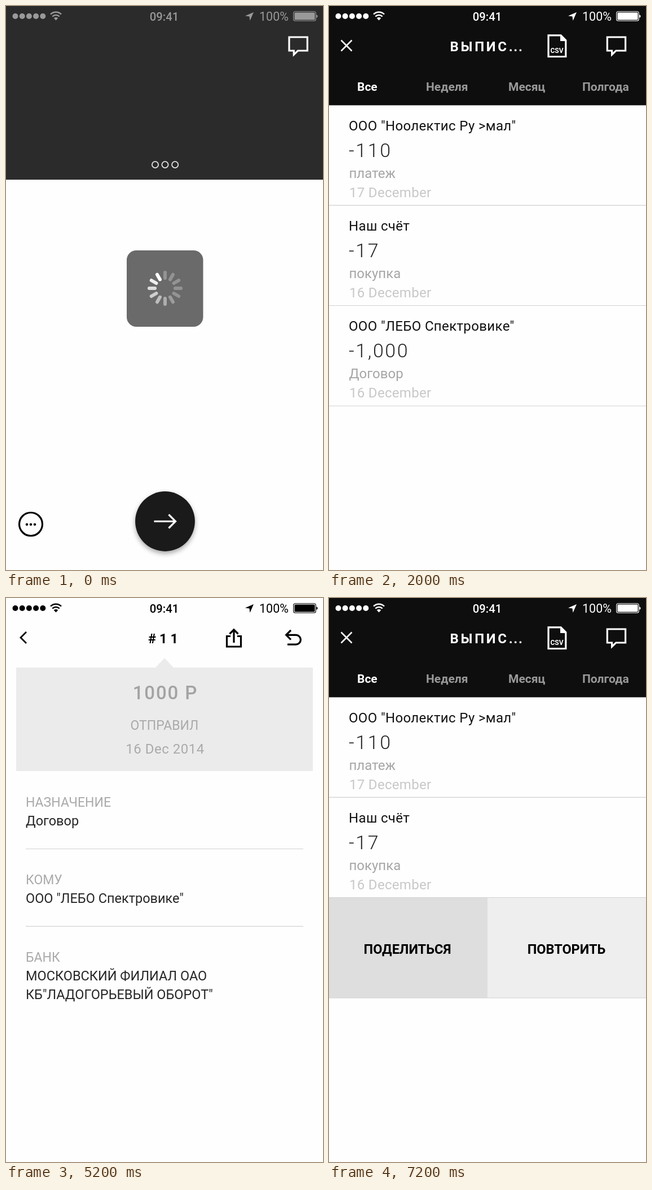
An HTML page that plays this animation: 562 px wide and 997 px high, repeating every 8000 ms.

```html
<!DOCTYPE html>
<html lang="ru">
<head>
<meta charset="utf-8">
<title>Выписка</title>
<style>
html, body { margin: 0; width: 100%; height: 100%; overflow: hidden; background: #fff; }
svg { display: block; width: 100%; height: 100%; font-family: Roboto, "Noto Sans", sans-serif; font-size: 24px; }
.line { fill: none; stroke: currentColor; stroke-width: 3.2; }
.mid { text-anchor: middle; }
.b { font-weight: 700; }
.name { letter-spacing: .35px; fill: #111; }
.sum { font-size: 34px; font-weight: 300; letter-spacing: 2.6px; fill: #222; }
.note { fill: #a6a6a6; }
.date { letter-spacing: .3px; fill: #c8c8c8; }
.tab { font-size: 21px; font-weight: 700; fill: #999; }
.label { font-size: 23px; fill: #aaa; }
.value { font-size: 23.5px; fill: #262626; }
.rule { stroke: #d2d2d2; stroke-width: 1.2; }

.status, .bar, .go, .loaded, .hud, .list, .panel, .shade, .press, .swipe { animation: 8s linear infinite; }
.status { animation-name: status; }
.bar { animation-name: bar; }
.go { animation-name: go; }
.loaded { animation-name: loaded; }
.hud { animation-name: hud; }
.spin { animation: spin 1s steps(12) infinite; }
.list { animation-name: appear, shift; }
.panel { animation-name: panel; }
.shade { animation-name: shade; }
.press { animation-name: press; }
.swipe { animation-name: swipe; }

@keyframes status {
  0% { color: #999; }
  4%, 48.75% { color: #fff; }
  54%, 66.5% { color: #000; }
  71.25% { color: #999; }
  74.5%, 100% { color: #fff; }
}
@keyframes bar { 0% { fill: #2b2b2b; } 4%, 100% { fill: #111; } }
@keyframes go { 0% { fill: #1a1a1a; } 4%, 100% { fill: #000; } }
@keyframes loaded { 0%, 12.5% { opacity: 0; } 15%, 100% { opacity: 1; } }
@keyframes hud { 0%, 11.5% { opacity: 1; } 14.5%, 100% { opacity: 0; } }
@keyframes spin { to { transform: rotate(360deg); } }
@keyframes appear { 0%, 17% { opacity: 0; } 23%, 100% { opacity: 1; } }
@keyframes shift {
  0%, 47.56% { transform: translateX(0); animation-timing-function: cubic-bezier(.4, 0, .2, 1); }
  55.06%, 66.12% { transform: translateX(-168.6px); animation-timing-function: cubic-bezier(.4, 0, .2, 1); }
  73.62%, 100% { transform: translateX(0); }
}
@keyframes panel {
  0%, 47.56% { transform: translateX(562px); animation-timing-function: cubic-bezier(.4, 0, .2, 1); }
  55.06%, 66.12% { transform: translateX(0); animation-timing-function: cubic-bezier(.4, 0, .2, 1); }
  73.62%, 100% { transform: translateX(562px); }
}
@keyframes shade { 0%, 47.5% { opacity: 0; } 48%, 55% { opacity: 1; } 66%, 100% { opacity: 0; } }
@keyframes press { 0%, 45.5% { opacity: 0; } 46.25%, 56.25% { opacity: 1; } 56.3%, 100% { opacity: 0; } }
@keyframes swipe {
  0%, 80.6% { transform: translateX(0); animation-timing-function: cubic-bezier(.4, 0, .2, 1); }
  89.4%, 100% { transform: translateX(-562px); }
}
</style>
</head>
<body>
<svg viewBox="0 0 562 997" preserveAspectRatio="none">
  <defs>
    <linearGradient id="edge">
      <stop offset="0" stop-opacity="0"/>
      <stop offset="1" stop-opacity=".18"/>
    </linearGradient>
    <path id="chat" class="line" d="M502 55H534.3V79H517.5L510.3 86V79H502Z"/>
  </defs>

  <!-- home -->
  <rect width="562" height="997" fill="#fefefe"/>
  <rect class="bar" width="562" height="307"/>
  <use href="#chat" color="#fff"/>
  <g fill="none" stroke="#e4e4e4" stroke-width="1.8">
    <circle cx="264.5" cy="280.5" r="5.6"/>
    <circle cx="282" cy="280.5" r="5.6"/>
    <circle cx="299.7" cy="280.5" r="5.6"/>
  </g>
  <g class="loaded">
    <g fill="#fff">
      <text x="72" y="136" font-size="30" font-weight="300">/</text>
      <text class="b" x="90" y="134" font-size="25" letter-spacing=".9">Информационные технологии</text>
      <text x="478" y="136" font-size="30" font-weight="300">/</text>
      <text class="mid" x="282.5" y="222" font-size="66" font-weight="300" letter-spacing="3.4">5,998 Р</text>
    </g>
    <circle cx="79" cy="369" r="44" fill="#e8e8e8"/>
    <text class="mid b" x="79" y="387" font-size="51" fill="#999">Л</text>
    <text x="140" y="371" font-size="40" font-weight="300" fill="#1c1c1c">ЛЕБО Спектровике</text>
    <text class="b" x="142" y="408" letter-spacing=".4" fill="#cdcdcd">15 December</text>
    <text x="298" y="408" letter-spacing=".15" fill="#d2d2d2">последний платёж</text>
  </g>
  <circle class="line" cx="44" cy="916" r="20.5"/>
  <circle cx="37" cy="916.5" r="2.2"/><circle cx="44" cy="916.5" r="2.2"/><circle cx="51" cy="916.5" r="2.2"/>
  <circle class="go" cx="282" cy="911" r="52.9" style="filter: drop-shadow(0 4px 4px rgba(0,0,0,.35))"/>
  <path class="line" color="#fff" d="M262.5 911H300M288.5 899L300.5 911L288.5 923"/>
  <g class="hud">
    <rect x="214" y="432" width="135.5" height="135" rx="17" fill="#6a6a6a"/>
    <g transform="translate(282 499)"><g class="spin" id="spokes"></g></g>
  </g>

  <!-- statement -->
  <g class="list">
    <rect width="562" height="997" fill="#fefefe"/>
    <rect width="562" height="175.5" fill="#0e0e0e"/>
    <g color="#fff" fill="#fff">
      <path class="line" style="stroke-width:2.6" d="M21.5 60.5L40.5 79.5M40.5 60.5L21.5 79.5"/>
      <text class="b" x="214.5" y="80" letter-spacing="3.7">ВЫПИС<tspan letter-spacing="1.6">...</tspan></text>
      <path class="line" d="M389 51.8H411L419.8 60.6V89.5H389Z"/>
      <path d="M410 51V62H421Z"/>
      <text class="mid b" x="404" y="83" font-size="12">CSV</text>
      <use href="#chat" x="-8.7"/>
    </g>
    <text class="tab" x="50" y="149.5" style="fill:#fff">Все</text>
    <text class="tab" x="172" y="149.5">Неделя</text>
    <text class="tab" x="318" y="149.5">Месяц</text>
    <text class="tab" x="449" y="149.5">Полгода</text>
    <g id="rows"></g>
    <path class="rule" d="M0 352.3H562M0 529.5H562M0 707H562"/>
  </g>

  <!-- payment details -->
  <g class="panel">
    <rect class="shade" x="-10" width="10" height="997" fill="url(#edge)"/>
    <rect width="562" height="997" fill="#fefefe"/>
    <path class="line" style="stroke-width:2.8" d="M36 60L26 70L36 80"/>
    <text class="b" x="252" y="80" font-size="23.5" letter-spacing="6">#11</text>
    <path class="line" d="M398 67.5H391.5V86H416.5V67.5H410M404 79V57M396.5 63.5L404 56L411.5 63.5"/>
    <path class="line" d="M497 65.3H514A8.4 8.4 0 0 1 514 82.1H499M505 57L496.7 65.3L505 73.6"/>
    <path fill="#ebebeb" d="M18 123H265L281 106L297 123H544V306H18Z"/>
    <text class="mid" x="282.5" y="178.5" font-size="33" font-weight="500" letter-spacing="1.9" fill="#a3a3a3">1000 Р</text>
    <text class="mid label" x="281" y="233">ОТПРАВИЛ</text>
    <text class="mid" x="282" y="275" letter-spacing=".5" fill="#aaa">16 Dec 2014</text>
    <g id="fields"></g>
    <path class="rule" d="M35 443.5H527M35 580.3H527"/>
  </g>

  <!-- status bar -->
  <g class="status" fill="currentColor">
    <g id="signal"></g>
    <path d="M88.5 25.5L84.8 21.5A5.4 5.4 0 0 1 92.2 21.5Z"/>
    <path class="line" style="stroke-width:2.5" d="M79 14.7A13.5 13.5 0 0 1 98 14.7M82.3 18.6A8.8 8.8 0 0 1 94.7 18.6"/>
    <text class="mid" x="280.5" y="25.5" font-size="20.3" font-weight="500">09:41</text>
    <path d="M439 11L432.5 26L431.5 18.6L424 17.6Z"/>
    <text x="449" y="25.5" font-size="21.5">100%</text>
    <rect class="line" style="stroke-width:1.1" x="509.7" y="9.7" width="39.5" height="16.6" rx="3"/>
    <rect x="511.5" y="11.5" width="36" height="13" rx="1.5"/>
    <path d="M550.3 15.2Q552.6 15.6 552.6 18T550.3 20.8Z"/>
  </g>
</svg>
<script>
const fill = (id, html) => { document.getElementById(id).innerHTML = html; };
const text = (cls, x, y, s) => `<text class="${cls}" x="${x}" y="${y}">${s}</text>`;
const range = n => [...Array(n).keys()];

fill('spokes', range(12).map(i =>
  `<line y1="-18" y2="-28" stroke="#fff" stroke-width="6" stroke-linecap="round"
    opacity="${Math.max(.28, 1 - i * .11)}" transform="rotate(${-30 * (i + 1)})"/>`).join(''));

fill('signal', range(5).map(i => `<circle cx="${16.5 + i * 12.2}" cy="18" r="5"/>`).join(''));

const firm = 'ООО "ЛЕБО Спектровике"';
const row = (y, name, sum, note, date) =>
  text('name', 35, y + 44.5, name) + text('sum', 35, y + 92, sum) +
  text('note', 35.5, y + 129, note) + text('date', 36, y + 162.5, date);

fill('rows',
  row(175, 'ООО "Ноолектис Ру &gt;мал"', '-110', 'платеж', '17 December') +
  row(352, 'Наш счёт', '-17', 'покупка', '16 December') +
  `<g class="swipe">
    <rect class="press" y="529" width="562" height="178" fill="#d9d9d9"/>
    ${row(529, firm, '-1,000', 'Договор', '16 December')}
    <g transform="translate(562 0)">
      <rect y="529" width="281" height="178" fill="#dedede"/>
      <rect x="281" y="529" width="281" height="178" fill="#eee"/>
      <g font-size="23.5">${text('mid b', 139, 628.5, 'ПОДЕЛИТЬСЯ')}${text('mid b', 421, 628.5, 'ПОВТОРИТЬ')}</g>
    </g>
  </g>`);

const field = (y, label, ...lines) =>
  text('label', 35, y, label) + lines.map((s, i) => text('value', 35, y + 33 * (i + 1), s)).join('');

fill('fields',
  field(369, 'НАЗНАЧЕНИЕ', 'Договор') +
  field(505.5, 'КОМУ', firm) +
  field(642.5, 'БАНК', 'МОСКОВСКИЙ ФИЛИАЛ ОАО', 'КБ"ЛАДОГОРЬЕВЫЙ ОБОРОТ"'));
</script>
</body>
</html>
```
